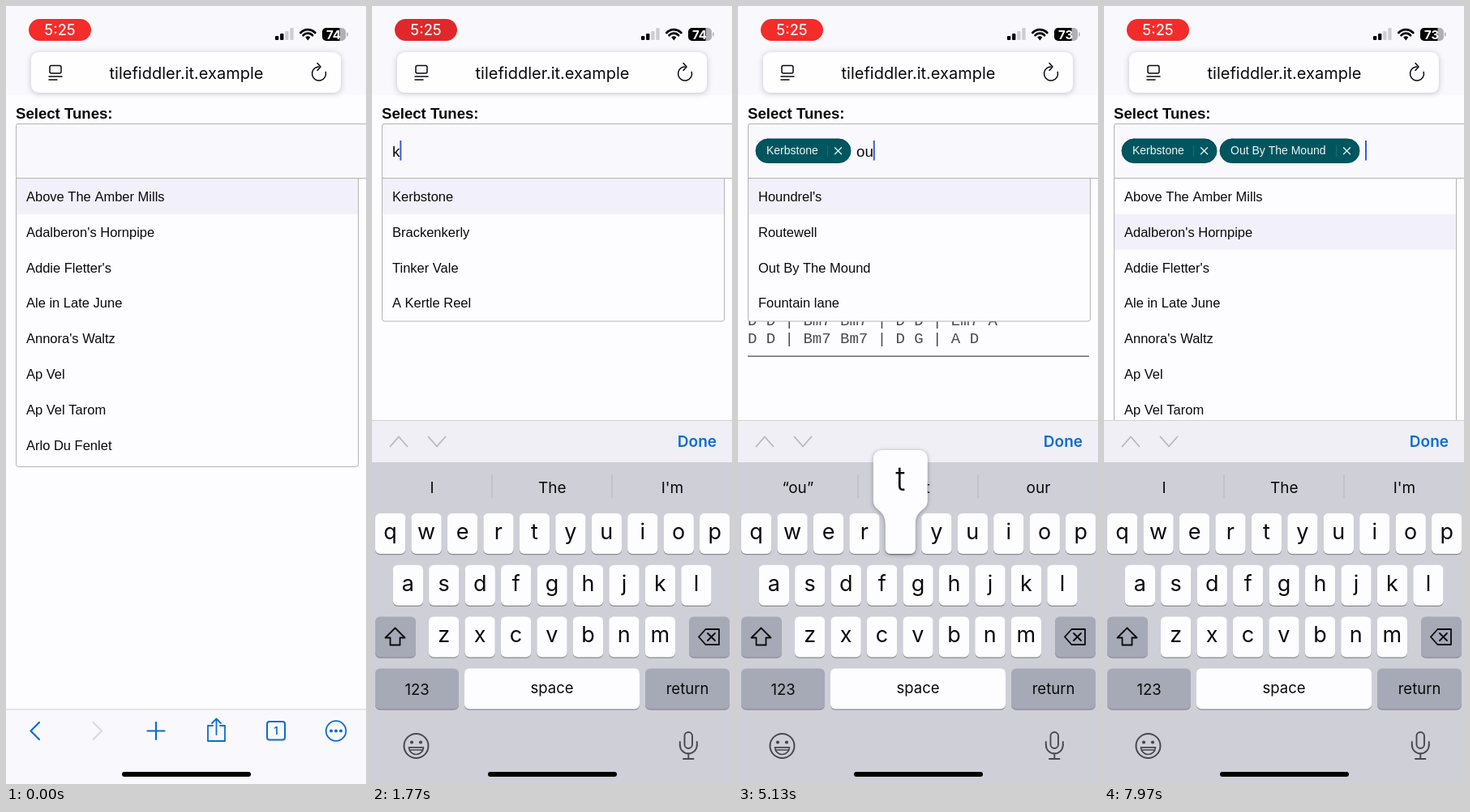
An HTML page with a canvas that plays this animation: 444x960 px, repeating every 8 s.

```html
<!DOCTYPE html>
<html lang="en">
<head>
<meta charset="utf-8">
<title>Tune picker</title>
<style>
html, body { margin: 0; width: 100%; height: 100%; overflow: hidden; background: #fdfcff; }
canvas { display: block; width: 444px; height: 960px; }
</style>
</head>
<body>
<canvas id="stage"></canvas>
<script>
const W = 444, H = 960, LOOP = 8000;
const UI = 'Inter, Roboto, sans-serif';
const PAGE = '"Liberation Sans", Arial, sans-serif';
const MONO = '"Liberation Mono", monospace';
const C = {
  page: '#fdfcff', chrome: '#f9f8fd', ink: '#0a0a0a', blue: '#0a6cd0', border: '#b4b4b2',
  hover: '#f2f0fa', board: '#cfcfd8', bar: '#f0eff6', key: '#fdfcff', dark: '#a6a9b6',
  edge: '#8a8a92', faint: '#cdcdd2', rule: '#d2d2d2', hint: '#e5e5ec', chip: '#00565f', caret: '#3a5bd6'
};

const ALL = ['Above The Amber Mills', "Adalberon's Hornpipe", "Addie Fletter's", 'Ale in Late June',
  "Annora's Waltz", 'Ap Vel', 'Ap Vel Tarom', 'Arlo Du Fenlet'];
const KER = ['Kerbstone', 'Brackenkerly', 'Tinker Vale', 'A Kertle Reel'];
const OU = ["Houndrel's", 'Routewell', 'Out By The Mound', 'Fountain lane'];
const OUT = ['Routewell', 'Out By The Mound', 'Scout Of The Lorvane', 'Stout Among Our Wild Oaks'];

// Each timeline holds [start in ms, value...]
const TYPED = [[0, '', ALL], [1700, 'k', KER], [2080, 'ke', KER], [2470, 'ker', KER],
  [2800, 'kerb', KER], [3080, 'kerbs', KER], [3500, '', ALL], [4550, 'o', OU],
  [4850, 'ou', OU], [5190, 'out', OUT], [7450, '', ALL]];
const HINTS = [[0, 'I', 'The', "I'm"], [1820, '“k”', 'I', 'know'], [2200, '“ke”', 'le', 'keep', 1],
  [2590, '“ker”', 'her', 'Kept', 1], [2920, '“kerb”', 'Verb', '', 1], [3200, '“kerbs”', 'Verbs', '', 1],
  [3900, 'I', 'The', "I'm"], [4670, '“o”', 'of', 'on'], [4970, '“ou”', 'out', 'our'],
  [5310, '“out”', 'outside', 'outfit'], [7650, 'I', 'The', "I'm"]];
const FOCUS = 950, SLIDE = 800, PICK1 = 3500, PICK2 = 7450, TAP2 = 7350;

const canvas = document.getElementById('stage');
const ctx = canvas.getContext('2d');
const dpr = window.devicePixelRatio || 1;
canvas.width = W * dpr;
canvas.height = H * dpr;

const at = (line, t) => line.filter(step => step[0] <= t).pop();

function rect(x, y, w, h, color) {
  ctx.fillStyle = color;
  ctx.fillRect(x, y, w, h);
}

function round(x, y, w, h, r, fill, stroke, width = 1) {
  ctx.beginPath();
  ctx.roundRect(x, y, w, h, r);
  if (fill) { ctx.fillStyle = fill; ctx.fill(); }
  if (stroke) { ctx.strokeStyle = stroke; ctx.lineWidth = width; ctx.stroke(); }
}

function line(points, color, width = 2) {
  ctx.beginPath();
  points.forEach(([x, y]) => ctx.lineTo(x, y));
  ctx.strokeStyle = color;
  ctx.lineWidth = width;
  ctx.stroke();
}

function arc(x, y, r, from, to, color, width) {
  ctx.beginPath();
  ctx.arc(x, y, r, from, to);
  ctx.strokeStyle = color;
  ctx.lineWidth = width;
  ctx.stroke();
}

function dot(x, y, r, color) {
  ctx.beginPath();
  ctx.arc(x, y, r, 0, Math.PI * 2);
  ctx.fillStyle = color;
  ctx.fill();
}

function text(str, x, y, font, color = C.ink, align = 'left') {
  ctx.font = font;
  ctx.fillStyle = color;
  ctx.textAlign = align;
  ctx.fillText(str, x, y);
}

function shadow(color, blur, dy) {
  ctx.shadowColor = color;
  ctx.shadowBlur = blur * dpr;
  ctx.shadowOffsetY = dy * dpr;
}

const noShadow = () => shadow('transparent', 0, 0);

function statusBar(t) {
  const glow = 0.5 + 0.5 * Math.cos(t / 2600 * Math.PI * 2);
  round(28, 16, 77, 27, 13.5, `rgb(${216 + 28 * glow}, ${38 + 6 * glow}, 42)`);
  text('5:25', 66.5, 36, `500 18px ${UI}`, '#fff0f0', 'center');

  [5, 8, 11, 15].forEach((h, i) => round(332 + i * 6.1, 42 - h, 4.3, h, 1, i < 2 ? '#000' : C.faint));

  const a = -Math.PI * 0.76, b = -Math.PI * 0.24;
  arc(372.3, 41.5, 12.3, a, b, '#000', 2.8);
  arc(372.3, 41.5, 7.8, a, b, '#000', 2.8);
  ctx.beginPath();
  ctx.moveTo(372.3, 42.5);
  ctx.arc(372.3, 41.5, 4.2, a, b);
  ctx.fillStyle = '#000';
  ctx.fill();

  ctx.save();
  ctx.beginPath();
  ctx.roundRect(390, 27, 29, 16, 5);
  ctx.clip();
  rect(390, 27, 29, 16, '#b0b0b4');
  rect(390, 27, 21.5, 16, '#000');
  ctx.restore();
  round(420, 32.5, 1.6, 5, 0.8, '#b0b0b4');
  text(t < 4400 ? '74' : '73', 404, 40.5, `700 15px ${UI}`, '#fff', 'center');
}

function addressBar() {
  shadow('rgba(70, 70, 85, .3)', 7, 1);
  round(31, 57, 382, 50, 9, '#fefdff');
  noShadow();
  round(54, 73.5, 14, 9.5, 2, null, C.ink, 1.5);
  line([[53, 87], [69, 87]], C.ink, 1.5);
  line([[53, 91], [63, 91]], C.ink, 1.5);
  text('tilefiddler.it.example', 222.5, 90, `400 20px ${UI}`, C.ink, 'center');
  arc(386, 83.5, 8.5, -0.25, Math.PI * 1.5, C.ink, 1.5);
  line([[384, 70.5], [388, 75], [384, 79.5]], C.ink, 1.5);
}

function toolbar() {
  rect(0, 868, W, 92, C.chrome);
  rect(0, 867.5, W, 1, C.rule);
  line([[41, 884], [30.5, 894.5], [41, 905]], C.blue, 2.2);
  line([[107.5, 884], [118, 894.5], [107.5, 905]], '#dadade', 2.2);
  line([[174.5, 894.5], [195.5, 894.5]], C.blue, 2.2);
  line([[185, 884], [185, 905]], C.blue, 2.2);
  line([[255, 888], [249, 888], [249, 907], [270, 907], [270, 888], [264, 888]], C.blue, 1.8);
  line([[259.5, 899], [259.5, 880]], C.blue, 1.8);
  line([[254, 885], [259.5, 879.5], [265, 885]], C.blue, 1.8);
  round(322, 883, 22, 22.5, 3, null, C.blue, 2);
  text('1', 333, 899, `600 13px ${UI}`, C.blue, 'center');
  arc(407, 894.5, 12.3, 0, Math.PI * 2, C.blue, 1.8);
  [-6, 0, 6].forEach(dx => dot(407 + dx, 894.5, 2, C.blue));
}

function chip(x, w, label, ready) {
  round(x, 164, w, 29.5, 14.75, C.chip, '#004b53');
  text(label, x + 13, 183, `14px ${PAGE}`, '#eef6f8');
  if (!ready) return;
  const cx = x + w - 15.5, cy = 178.8, r = 4;
  rect(x + w - 29, 172, 1, 14, '#1a6a72');
  line([[cx - r, cy - r], [cx + r, cy + r]], '#e2f0f2', 1.3);
  line([[cx + r, cy - r], [cx - r, cy + r]], '#e2f0f2', 1.3);
}

function chordSheet() {
  const font = `19px ${MONO}`;
  text('D D | Bm7 Bm7 | D D | Em7 A', 12, 394, font, '#4a4a4a');
  text('D D | Bm7 Bm7 | D G | A D', 12, 416, font, '#4a4a4a');
  rect(12, 431.5, 421, 1.3, '#555');
}

function picker(t) {
  const [since, typed, items] = at(TYPED, t);
  text('Select Tunes:', 12, 139, `bold 18.6px ${PAGE}`);
  if (t >= PICK1 + 400) chordSheet();

  round(12.5, 145.5, 460, 67, 2, C.chrome, C.border);
  let x = 25;
  if (t >= PICK1) { chip(22, 117, 'Kerbstone', t >= PICK1 + 300); x = 146; }
  if (t >= PICK2) { chip(143, 172, 'Out By The Mound', t >= PICK2 + 200); x = 322; }
  text(typed, x, 185.5, `18.7px ${PAGE}`);
  const edited = Math.max(since, FOCUS);
  if (t >= FOCUS && (t - edited) % 1000 < 600) {
    rect(x + (typed ? ctx.measureText(typed).width : 0), 166, 2, 24.5, C.caret);
  }

  const row = 43.8, bottom = items.length > 4 ? 568.5 : 389;
  round(12.5, 212.5, 422, bottom - 212.5, [0, 0, 3, 3], C.page, C.border);
  rect(13, 213 + (t >= TAP2 ? row : 0), 421, row, C.hover);
  items.forEach((name, i) => text(name, 25, 241 + i * row, `16.5px ${PAGE}`));
  rect(12, 212, 432, 1, C.border);
}

function keyCap(x, y, w, color) {
  round(x, y + 1.3, w, 50, 6, C.edge);
  round(x, y, w, 50, 6, color);
}

function popup(x, y, letter) {
  const l = x - 15, r = x + 52, top = y - 78, mid = y - 16;
  ctx.beginPath();
  ctx.moveTo(l + 10, top);
  ctx.arcTo(r, top, r, mid, 10);
  ctx.lineTo(r, mid);
  ctx.bezierCurveTo(r, mid + 14, x + 37, mid + 10, x + 37, mid + 30);
  ctx.arcTo(x + 37, y + 50, x, y + 50, 6);
  ctx.arcTo(x, y + 50, x, mid + 30, 6);
  ctx.lineTo(x, mid + 30);
  ctx.bezierCurveTo(x, mid + 10, l, mid + 14, l, mid);
  ctx.arcTo(l, top, r, top, 10);
  ctx.closePath();
  shadow('rgba(50, 50, 60, .45)', 5, 1);
  ctx.fillStyle = C.key;
  ctx.fill();
  noShadow();
  text(letter, x + 18.5, y - 28, `300 41px ${UI}`, C.ink, 'center');
}

function pressedKey(t) {
  const next = TYPED.find(step => step[1] && t >= step[0] - 100 && t < step[0]);
  return next ? next[1].slice(-1) : '';
}

function hints(t) {
  const [, left, mid, right, marked] = at(HINTS, t);
  if (marked) round(148, 571, 148, 45, 5, C.hint);
  else [147.5, 295.5].forEach(x => rect(x, 578, 1, 29, '#b6b6be'));
  [left, mid, right].forEach((word, i) =>
    text(word, 74 + i * 148.2, 600.5, `400 19px ${UI}`, C.ink, 'center'));
}

function boardIcons() {
  // shift
  line([[28.5, 767.5], [16.5, 779.5], [22.5, 779.5], [22.5, 788.5], [34.5, 788.5],
    [34.5, 779.5], [40.5, 779.5], [28.5, 767.5], [27.5, 768.5]], C.ink, 1.8);
  // delete
  line([[403, 778.5], [411.5, 769], [428, 769], [428, 788], [411.5, 788], [403, 778.5], [404, 777.4]], C.ink, 1.8);
  line([[414, 774], [423, 783]], C.ink, 1.8);
  line([[423, 774], [414, 783]], C.ink, 1.8);
  // face
  const grey = '#48484e';
  arc(54.5, 913, 15, 0, Math.PI * 2, grey, 2);
  dot(49, 908.5, 2.1, grey);
  dot(60, 908.5, 2.1, grey);
  ctx.beginPath();
  ctx.arc(54.5, 914.5, 9, 0.05, Math.PI - 0.05);
  ctx.closePath();
  ctx.strokeStyle = grey;
  ctx.lineWidth = 1.7;
  ctx.stroke();
  line([[46.5, 918], [62.5, 918]], grey, 1.3);
  // microphone
  round(385.5, 896, 9.5, 20, 4.75, null, grey, 1.9);
  line([[379.8, 908], [379.8, 912]], grey, 1.9);
  line([[400.8, 908], [400.8, 912]], grey, 1.9);
  arc(390.3, 912, 10.5, 0, Math.PI, grey, 1.9);
  line([[390.3, 922.5], [390.3, 929]], grey, 1.9);
  line([[384, 929], [396.5, 929]], grey, 1.9);
}

function keyboard(t) {
  const wt = 18.26 * (t - SLIDE) / 1000;
  if (wt <= 0) return;
  const offset = 449 * (1 + wt) * Math.exp(-wt);
  ctx.save();
  ctx.translate(0, offset < 0.5 ? 0 : offset);

  rect(0, 511, W, 52, C.bar);
  rect(0, 511, W, 1, C.rule);
  line([[22.5, 543.5], [33, 531.5], [43.5, 543.5]], '#b8b8bc', 1.8);
  line([[69.5, 531.5], [80, 543.5], [90.5, 531.5]], '#b8b8bc', 1.8);
  text('Done', 425, 544, `600 19px ${UI}`, C.blue, 'right');
  rect(0, 563, W, 460, C.board);
  hints(t);

  const pressed = pressedKey(t);
  let bubble = null;
  [['qwertyuiop', 4], ['asdfghjkl', 25.7], ['zxcvbnm', 70]].forEach(([letters, left], row) => {
    const y = 626 + row * 63.7;
    [...letters].forEach((letter, i) => {
      const x = left + i * 44.45;
      keyCap(x, y, 37.3, C.key);
      if (letter === pressed) bubble = [x, y, letter];
      else text(letter, x + 18.6, y + 32, `400 27px ${UI}`, C.ink, 'center');
    });
  });
  keyCap(4, 753.4, 50, C.dark);
  keyCap(391, 753.4, 50, C.dark);
  [['123', 4, 103, C.dark, 849.5], ['space', 114, 216, C.key, 848], ['return', 337, 104, C.dark, 849]]
    .forEach(([label, x, w, color, base]) => {
      keyCap(x, 817.5, w, color);
      text(label, x + w / 2, base, `400 18.5px ${UI}`, C.ink, 'center');
    });
  boardIcons();
  if (bubble) popup(...bubble);
  ctx.restore();
}

function draw(t) {
  ctx.setTransform(dpr, 0, 0, dpr, 0, 0);
  ctx.lineCap = 'round';
  ctx.lineJoin = 'round';
  rect(0, 0, W, H, C.page);
  rect(0, 0, W, 110, C.chrome);
  statusBar(t);
  addressBar();
  picker(t);
  toolbar();
  keyboard(t);
  round(143, 945, 159, 6, 3, '#000');
}

const start = performance.now();
function tick() {
  draw((performance.now() - start) % LOOP);
  requestAnimationFrame(tick);
}
tick();
</script>
</body>
</html>
```
